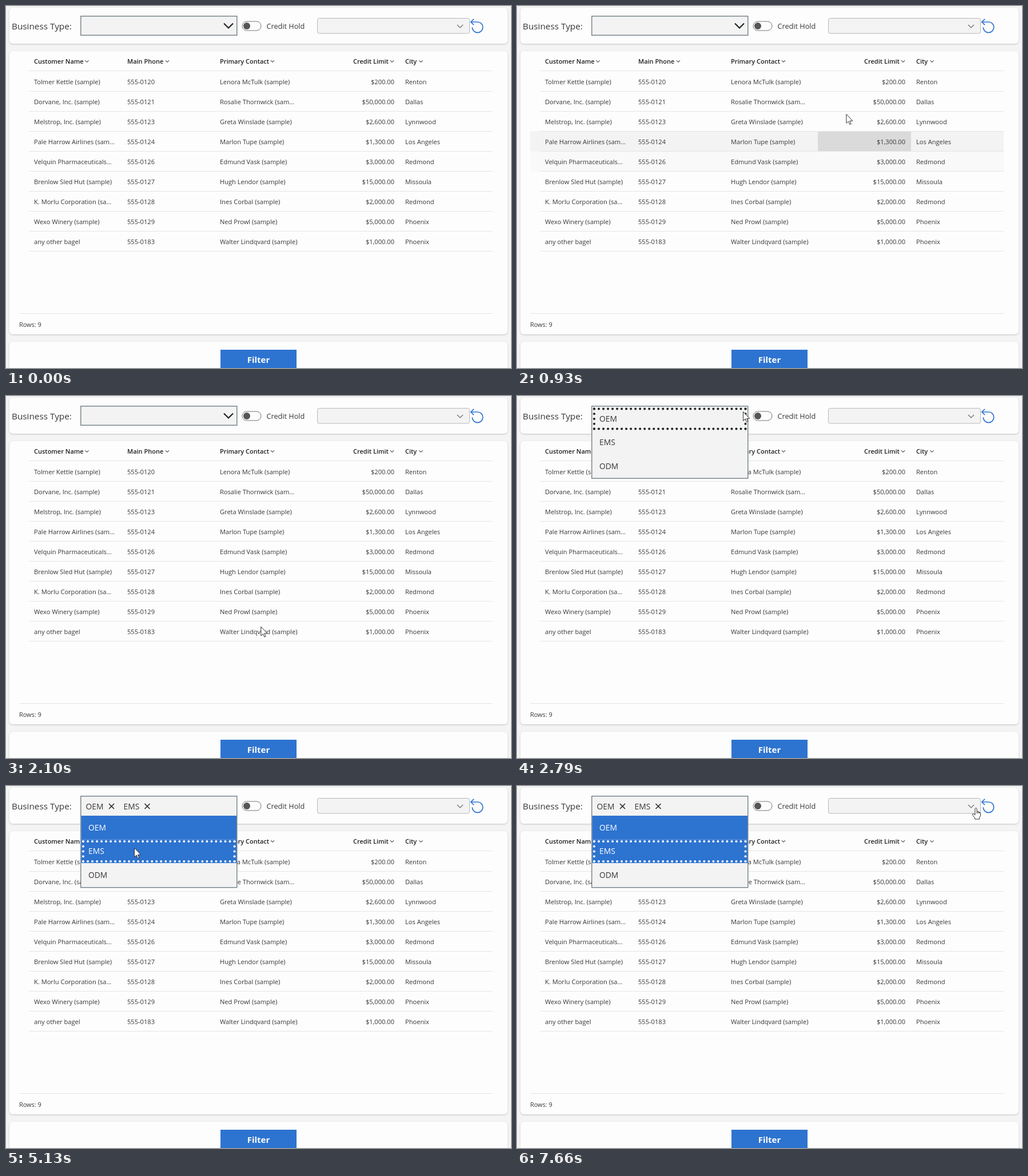
An HTML page with a canvas that plays this animation: 883 px wide and 634 px high, repeating every 8000 ms.

```html
<!DOCTYPE html>
<html lang="en">
<head>
<meta charset="utf-8">
<title>Customer filter</title>
<style>
html, body { margin: 0; width: 100%; height: 100%; overflow: hidden; background: #f4f4f4; }
canvas { display: block; }
</style>
</head>
<body>
<canvas id="stage" width="883" height="634"></canvas>
<script>
const ctx = document.getElementById('stage').getContext('2d');
const LOOP = 8000, BLUE = '#2d73d0', INK = '#373737', DARK = '#202020';
const FIELD = '#f3f3f4', EDGE = '#7b878c';
const ROW_TOP = 114, ROW_H = 35;
const COLS = [40, 203, 364, 526, 689, 851];

const rows = [
  ['Tolmer Kettle (sample)', '555-0120', 'Lenora McTulk (sample)', '$200.00', 'Renton'],
  ['Dorvane, Inc. (sample)', '555-0121', 'Rosalie Thornwick (sam...', '$50,000.00', 'Dallas'],
  ['Melstrop, Inc. (sample)', '555-0123', 'Greta Winslade (sample)', '$2,600.00', 'Lynnwood'],
  ['Pale Harrow Airlines (sam...', '555-0124', 'Marlon Tupe (sample)', '$1,300.00', 'Los Angeles'],
  ['Velquin Pharmaceuticals...', '555-0126', 'Edmund Vask (sample)', '$3,000.00', 'Redmond'],
  ['Brenlow Sled Hut (sample)', '555-0127', 'Hugh Lendor (sample)', '$15,000.00', 'Missoula'],
  ['K. Morlu Corporation (sa...', '555-0128', 'Ines Corbal (sample)', '$2,000.00', 'Redmond'],
  ['Wexo Winery (sample)', '555-0129', 'Ned Prowl (sample)', '$5,000.00', 'Phoenix'],
  ['any other bagel', '555-0183', 'Walter Lindqvard (sample)', '$1,000.00', 'Phoenix']
];

// Pointer path: time, x, y
const path = [
  [520, 871, 580], [580, 780, 385], [650, 735, 350], [720, 710, 319], [900, 590, 200],
  [1280, 411, 64], [1340, 414, 345], [1410, 418, 374], [1760, 470, 588], [1840, 470, 588],
  [2520, 395, 27], [3120, 395, 27], [3280, 350, 45], [3380, 328, 39], [3790, 328, 39],
  [4180, 225, 105], [5070, 225, 105], [5130, 224, 108], [5660, 224, 108], [6380, 775, 34],
  [6720, 775, 34], [7050, 824, 24], [7200, 824, 24], [7660, 802, 37.5], [LOOP, 802, 37.5]
];

function pointer(t) {
  const i = path.findIndex(k => k[0] > t);
  if (i < 1) return null;
  const [t0, x0, y0] = path[i - 1], [t1, x1, y1] = path[i];
  let u = (t - t0) / (t1 - t0);
  if (t0 > 1800) u = u * u * (3 - 2 * u);
  return { x: x0 + (x1 - x0) * u, y: y0 + (y1 - y0) * u };
}

function text(s, x, y, size, color = INK, weight = 400, align = 'left') {
  ctx.font = `${weight} ${size}px "Open Sans", "Noto Sans", sans-serif`;
  ctx.fillStyle = color;
  ctx.textAlign = align;
  ctx.fillText(s, x, y + size * 0.36);
}

function rect(x, y, w, h, color) {
  ctx.fillStyle = color;
  ctx.fillRect(x, y, w, h);
}

function line(points, color, width = 1) {
  ctx.beginPath();
  points.forEach(p => ctx.lineTo(p[0], p[1]));
  ctx.strokeStyle = color;
  ctx.lineWidth = width;
  ctx.stroke();
}

function round(x, y, w, h, r, fill, stroke) {
  ctx.beginPath();
  ctx.roundRect(x, y, w, h, r);
  ctx.fillStyle = fill;
  ctx.fill();
  if (!stroke) return;
  ctx.strokeStyle = stroke;
  ctx.lineWidth = 1;
  ctx.stroke();
}

const chevron = (x, y, w, h, color, width) =>
  line([[x - w, y - h], [x, y + h], [x + w, y - h]], color, width);

function card(y, h) {
  ctx.save();
  ctx.shadowColor = 'rgba(0,0,0,.2)';
  ctx.shadowBlur = 3;
  ctx.shadowOffsetY = 1;
  round(6, y, 871, h, 6, '#fdfdfd');
  ctx.restore();
}

function box(h) {
  rect(130, 17, 274.5, h, EDGE);
  rect(131.5, 18.5, 271.5, h - 3, FIELD);
}

function dots(y, color) {
  const [l, r, top, bottom] = [135, 399.5, y - 17.5, y + 17.5];
  const run = (x1, y1, x2, y2, n) => {
    for (let i = 0; i <= n; i++) {
      ctx.beginPath();
      ctx.arc(x1 + (x2 - x1) * i / n, y1 + (y2 - y1) * i / n, 2, 0, 7);
      ctx.fill();
    }
  };
  ctx.fillStyle = color;
  run(l, top, r, top, 33);
  run(l, bottom, r, bottom, 33);
  run(l, top, l, bottom, 4);
  run(r, top, r, bottom, 4);
}

function tag(s, x, crossX) {
  text(s, x, 36, 13.8);
  for (const d of [-4.5, 4.5]) line([[crossX - 4.5, 35.5 - d], [crossX + 4.5, 35.5 + d]], DARK, 1.5);
}

function dropdown(t) {
  if (t < 2720) {
    box(35);
    chevron(389, 34.5, 8, 4, DARK, 2.2);
    return;
  }
  const picked = t < 3520 ? 0 : t < 4720 ? 1 : 2;
  const top = picked ? 52 : 19;
  box(picked ? 161.5 : 128);
  if (picked > 0) tag('OEM', 139.5, 184.5);
  if (picked > 1) tag('EMS', 205.5, 247);
  ['OEM', 'EMS', 'ODM'].forEach((s, i) => {
    const y = top + 41.5 * i, mid = y + 21, on = i < picked;
    if (on) rect(131.5, y, 271.5, 41.5, BLUE);
    text(s, 144, mid, 13.8, on ? '#fff' : INK);
    if (i === Math.max(0, picked - 1) && t >= 2790) dots(mid, on ? '#fff' : DARK);
  });
}

function topBar() {
  card(3, 63);
  text('Business Type:', 10, 35.5, 15.3);
  round(413, 27, 33, 16, 8, '#fdfdfd', '#777');
  ctx.beginPath();
  ctx.arc(421, 35, 6, 0, 7);
  ctx.fillStyle = '#555';
  ctx.fill();
  text('Credit Hold', 455.5, 35.5, 12.7);
  round(544.5, 21.5, 266, 26.5, 3, '#f3f3f3', '#b8b8b8');
  chevron(794, 35.5, 5, 2.5, '#666', 1.1);
  line([[818, 22.8], [812.8, 28], [818, 33.2]], BLUE, 1.7);
  ctx.beginPath();
  ctx.moveTo(812.8, 28);
  ctx.lineTo(824.5, 28);
  ctx.arc(824.5, 37.3, 9.3, -Math.PI / 2, Math.PI);
  ctx.stroke();
}

function hoveredCell(p) {
  if (!p) return null;
  const row = Math.floor((p.y - ROW_TOP) / ROW_H);
  const col = COLS.findIndex((x, i) => p.x >= x && p.x < COLS[i + 1]);
  return row >= 0 && row < rows.length && col >= 0 ? { row, col } : null;
}

function table(t) {
  card(79, 496);
  // The highlight trails the pointer slightly
  const fading = hoveredCell(pointer(t - 140)), hover = hoveredCell(pointer(t - 70));
  const rowY = i => ROW_TOP + i * ROW_H + 0.5;
  if (fading) rect(23, rowY(fading.row), 828, ROW_H, '#f9f9f9');
  if (hover) {
    rect(23, rowY(hover.row), 828, ROW_H, '#f3f3f3');
    const x = COLS[hover.col];
    round(x, rowY(hover.row), COLS[hover.col + 1] - x, ROW_H, 2, '#dadada');
  }
  [['Customer Name', 49, 141.5], ['Main Phone', 212, 282], ['Primary Contact', 374, 466],
   ['Credit Limit', 607, 675], ['City', 698, 725.5]].forEach(([s, x, mark]) => {
    text(s, x, 97.5, 11, DARK, 600);
    chevron(mark, 96.8, 3, 1.5, '#444', 1.1);
  });
  for (let i = 0; i <= rows.length; i++) {
    const y = ROW_TOP + i * ROW_H - 0.5 + (i > 0);
    line([[40, y], [851, y]], '#e5e5e5');
  }
  rows.forEach((cells, i) => cells.forEach((s, c) =>
    text(s, [49, 212, 374, 679, 698][c], 133 + i * ROW_H, 11.1, INK, 400, c === 3 ? 'right' : 'left')));
  line([[23, 538.5], [851, 538.5]], '#e5e5e5');
  text('Rows: 9', 23, 558, 10.9);
}

const arrow = new Path2D('M0 0V16L3.7 12.6L6 18L8.3 17L6 11.8H11Z');
const hand = new Path2D('M-1.6 1.5Q0 -1 1.6 1.5V6.5L4 7L6.3 8Q8 8.3 8 10V14L6 17.5V20H-2V18' +
  'L-6 12.5Q-6.3 10 -4 10.8L-1.6 13Z');

function drawPointer(t) {
  const p = pointer(t);
  if (!p) return;
  const link = p.x > 544 && p.y > 20 && p.y < 48 && t > 5000;
  const shape = link ? hand : arrow;
  ctx.save();
  ctx.translate(p.x + 0.5, p.y + 0.5);
  ctx.fillStyle = '#fff';
  ctx.fill(shape);
  ctx.strokeStyle = '#333';
  ctx.lineWidth = 1;
  ctx.stroke(shape);
  if (link) for (const x of [1.6, 3.8, 6]) line([[x, 7], [x, 10]], '#333');
  ctx.restore();
}

function draw(now) {
  const t = now % LOOP;
  rect(0, 0, 883, 634, '#f4f4f4');
  topBar();
  table(t);
  card(588, 70);
  rect(375, 602, 133, 32, BLUE);
  text('Filter', 441.5, 620, 15, '#fff', 700, 'center');
  dropdown(t);
  drawPointer(t);
  requestAnimationFrame(draw);
}
requestAnimationFrame(draw);
</script>
</body>
</html>
```
